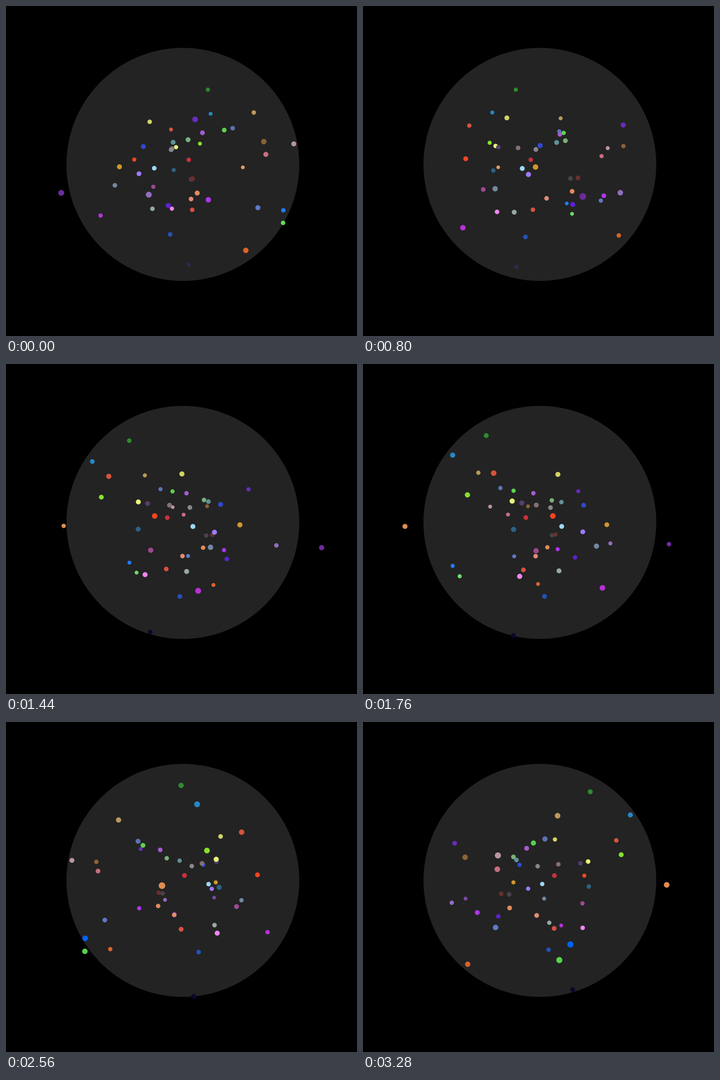
Animation of 772 by 725 pixels, one loop 3.36 s. Source, as a matplotlib script:

```python
import numpy as np
import matplotlib.pyplot as plt
from matplotlib.animation import FuncAnimation
from matplotlib.colors import to_rgba_array

W, H, DPI = 772, 725, 100
FRAMES, INTERVAL = 42, 80
CX, CY = 389, 348       # axis of rotation on screen
CAMERA = 950            # eye distance from the axis
DISC_R = 256            # globe outline on screen
GLOBE_R = 247           # globe radius in space
DOT_R = 5.1
STEP = np.radians(6.78)  # turn per frame
LAG = 1.2               # frames lost while spinning up

# colour and starting place (x right, y down, z away from the viewer)
DOTS = [
    ("#0c790c", 61, -182.2, 103.8), ("#0274be", 72.8, -132.7, 183.8),
    ("#ad8a3f", 161.4, -117.9, 32.8), ("#5109b3", 21.8, -79.8, -183.2),
    ("#c8cd4a", -75.7, -97.1, 35.6), ("#d0381c", -30.8, -90.7, 173.4),
    ("#9541c8", 41.8, -67.4, -27.7), ("#41ca33", 89.8, -74.4, -12.6),
    ("#3f5ca5", 110.7, -80.4, 10.2), ("#457f85", -20.3, -45.9, -52.6),
    ("#62a566", 10.8, -51, -57.4), ("#74dd09", 44.3, -53.8, 170.6),
    ("#0e2aca", -82.5, -37.2, -48.9), ("#e6f062", -16.7, -42.2, 107.9),
    ("#381c58", -28, -38.7, 91.7), ("#74727b", -25.6, -32, -5.1),
    ("#725858", -24, -36.3, 41.5), ("#ed2800", -119.3, -11.8, 109.7),
    ("#bf101e", 13.4, -10.4, 31.6), ("#ac858c", 226.1, -41.8, -69.7),
    ("#7b4817", 152.2, -42.8, -137.7), ("#bf566b", 167.8, -20.2, -76.6),
    ("#c8870c", -129.7, 4.9, -66.5), ("#90d1f7", -63.3, 8.4, 5.4),
    ("#8c66f9", -93.6, 19.9, -28.6), ("#0c4870", -22.4, 13.8, 110.1),
    ("#e08c50", 164, 8.1, 231), ("#4f0e0c", 19.2, 28.9, -83.3),
    ("#2c2328", 17.2, 30.2, -66.3), ("#5b7493", -151.2, 46.5, 10.5),
    ("#8e2c80", -71.9, 54.3, 100.5), ("#6a2c9c", -211.8, 48.9, -200.5),
    ("#8054b5", -58.7, 52.1, -206), ("#db793f", 29.4, 58.7, -64.4),
    ("#dd795f", 17.8, 75.5, -6.9), ("#9e15e9", 48.3, 67.1, -130.5),
    ("#4100c8", -28.8, 81.4, -94.3), ("#f070f0", -26.5, 107.1, 96.6),
    ("#879993", -68.5, 99.7, 22), ("#d43325", 21.2, 103.1, 30.8),
    ("#ac0ecf", -191.6, 119, 55.8), ("#4664ba", 150.8, 87, -81.6),
    ("#0064fa", 232.9, 106.2, 51.3), ("#54d44e", 228.2, 133, 33.1),
    ("#0035ac", -28.6, 156.9, 19.6), ("#d14a05", 118.3, 161.3, -138.7),
    ("#08082c", 14, 236.5, 71),
]
colors = to_rgba_array([d[0] for d in DOTS])
x0, y0, z0 = np.array([d[1:] for d in DOTS], float).T
outside = np.sqrt(x0**2 + y0**2 + z0**2) > GLOBE_R

fig = plt.figure(figsize=(W / DPI, H / DPI), dpi=DPI, facecolor="black")
ax = fig.add_axes([0, 0, 1, 1])
ax.set_xlim(0, W)
ax.set_ylim(H, 0)
ax.axis("off")

# translucent globe, tinting every dot behind or inside it
ax.add_patch(plt.Circle((CX, CY), DISC_R, fc="white", ec="none",
                        alpha=36 / 255, zorder=2))
behind = ax.scatter([], [], linewidths=0, zorder=1)
front = ax.scatter([], [], linewidths=0, zorder=3)


def place(layer, pick, x, y, scale):
    layer.set_offsets(np.column_stack([x[pick], y[pick]]))
    layer.set_sizes((2 * DOT_R * scale[pick] * 72 / DPI) ** 2)
    layer.set_facecolors(colors[pick])


def draw(n):
    turn = STEP * (n - LAG * (1 - np.exp(-n)))
    c, s = np.cos(turn), np.sin(turn)
    x, z = x0 * c - z0 * s, x0 * s + z0 * c
    scale = 1 / (1 + z / CAMERA)
    sx, sy = CX + x * scale, CY + y0 * scale
    order = np.argsort(-z)  # far dots first
    near = (outside & (z < 0))[order]
    place(behind, order[~near], sx, sy, scale)
    place(front, order[near], sx, sy, scale)
    return behind, front


anim = FuncAnimation(fig, draw, frames=FRAMES, interval=INTERVAL,
                     repeat=True, repeat_delay=0)
plt.show()
```
